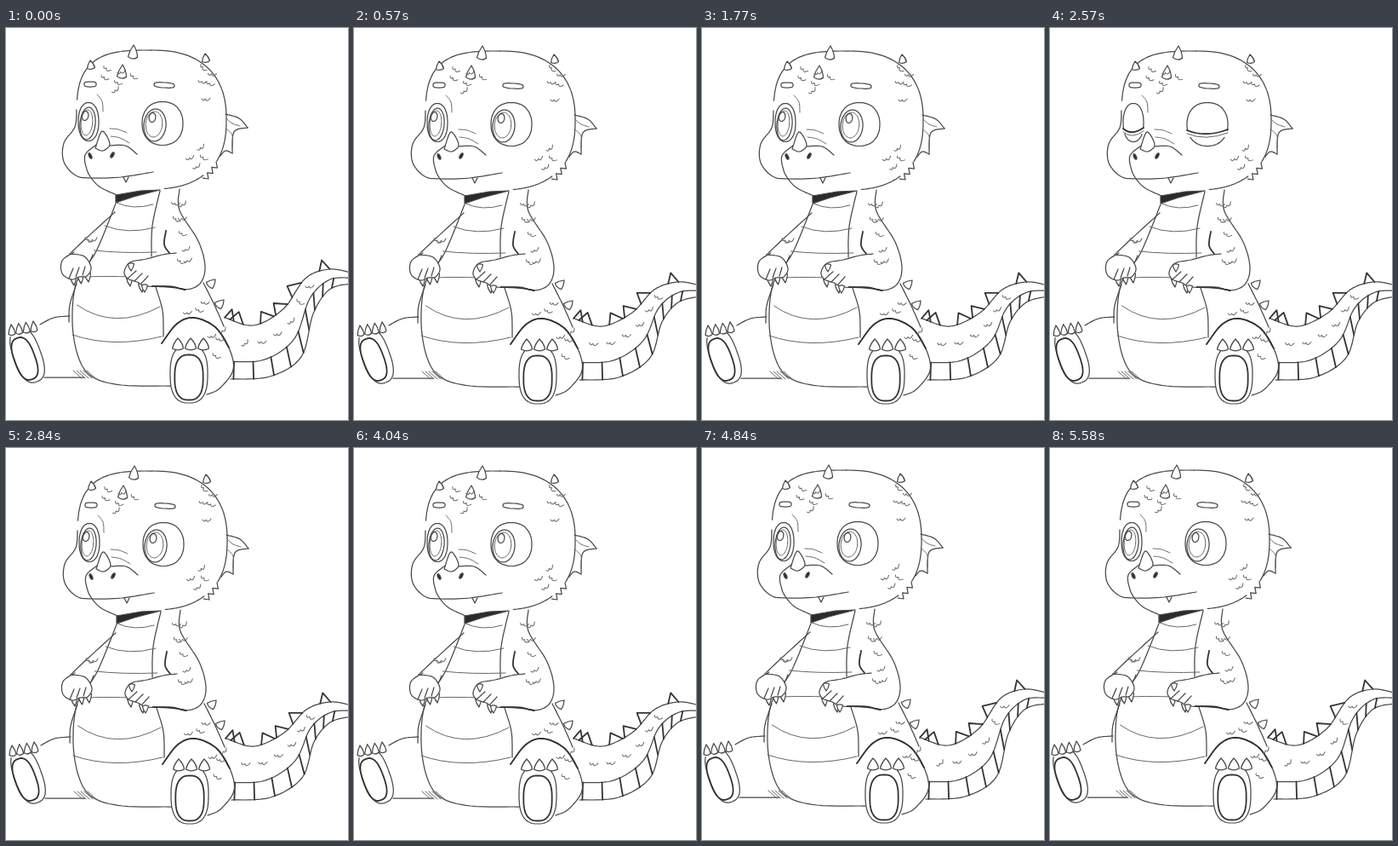
Animation of 402 by 460 pixels, one loop 6070 ms. Source, as an HTML page:

```html
<!DOCTYPE html>
<html lang="en">
<head>
<meta charset="utf-8">
<title>Little dragon</title>
<style>
html, body { margin: 0; width: 100%; height: 100%; overflow: hidden; background: #fff; }
svg { display: block; width: 402px; height: 460px; fill: none; stroke: #484848; stroke-width: 1.25; stroke-linecap: round; stroke-linejoin: round; }
.thin { stroke: #666; stroke-width: 1; }
.bold { stroke: #333; stroke-width: 1.8; }
.white { fill: #fff; }
.ink { fill: #2b2b2b; }
</style>
</head>
<body>
<svg viewBox="0 0 402 460"><g id="dragon"></g></svg>
<script>
const LOOP = 6070;
const dragon = document.getElementById('dragon');

const mix = (a, b, t) => a + (b - a) * t;
const mixPoint = (p, q, t) => p.map((v, i) => mix(v, q[i], t));
const parse = s => s.split(' ').map(p => p.split(',').map(Number));
const range = (n, fn) => Array.from({ length: n }, (_, i) => fn(i));

let seed = 11;
const random = () => (seed = seed * 16807 % 2147483647) / 2147483647;

function group(parent = dragon) {
  const g = document.createElementNS('http://www.w3.org/2000/svg', 'g');
  return parent.appendChild(g);
}
function path(g, d, cls = '') {
  const el = document.createElementNS('http://www.w3.org/2000/svg', 'path');
  el.setAttribute('d', d);
  el.setAttribute('class', cls);
  return g.appendChild(el);
}
const line = (g, pts, cls) => path(g, 'M' + pts.map(p => p.map(v => v.toFixed(1))).join('L'), cls);

// Point at t on a Catmull-Rom curve; whole values of t are the key points
function along(pts, t) {
  const i = Math.max(0, Math.min(pts.length - 2, Math.floor(t))), u = t - i;
  const b = pts[i], c = pts[i + 1], a = pts[i - 1] || b, d = pts[i + 2] || c;
  return b.map((v, k) => v + u / 2 * (c[k] - a[k]
    + u * (2 * a[k] - 5 * v + 4 * c[k] - d[k] + u * (3 * (v - c[k]) + d[k] - a[k]))));
}
const smooth = pts => range((pts.length - 1) * 8 + 1, i => along(pts, i / 8));
const curve = (g, keys, cls) => line(g, smooth(parse(keys)), cls);

// Superellipse arc, angles in degrees clockwise from the right
function arc(g, cx, cy, rx, ry, { n = 2, turn = 0, from = 0, to = 360, cls = '' } = {}) {
  const round = v => Math.sign(v) * Math.abs(v) ** (2 / n);
  const s = Math.sin(turn * Math.PI / 180), c = Math.cos(turn * Math.PI / 180);
  line(g, range(49, i => {
    const a = mix(from, to, i / 48) * Math.PI / 180;
    const x = rx * round(Math.cos(a)), y = ry * round(Math.sin(a));
    return [cx + x * c - y * s, cy + x * s + y * c];
  }), cls);
}

// Row of claws between two points, each pointing along (dx, dy)
function claws(g, n, start, end, width, dx, dy) {
  const len = Math.hypot(dx, dy), wx = -dy / len * width / 2, wy = dx / len * width / 2;
  range(n, i => {
    const [x, y] = mixPoint(start, end, i / (n - 1));
    path(g, `M${x - wx},${y - wy}Q${x - wx * .8 + dx * .5},${y - wy * .8 + dy * .5} ${x + dx},${y + dy}`
      + `Q${x + wx * .9 + dx * .5},${y + wy * .9 + dy * .5} ${x + wx},${y + wy}Q${x - dx * .3},${y - dy * .3} ${x - wx},${y - wy}`, 'white');
  });
}

function scale(g, x, y) {
  const mark = path(g, 'M-5,-1q1,4 4,1q1,5 6,0', 'thin');
  mark.setAttribute('transform', `translate(${x} ${y}) rotate(${random() * 90 - 50})`);
}
function scatter(g, n, cx, cy, rx, ry) {
  range(n, i => {
    const a = i * 2.4 + random(), r = Math.sqrt((i + .5) / n);
    scale(g, cx + rx * r * Math.cos(a), cy + ry * r * Math.sin(a));
  });
}

function drawTail(raised) {
  const g = group();
  const clamp = v => Math.max(0, Math.min(1, v));
  const pose = ([x, y]) => {
    const t = clamp((x - 305) / 60);
    return [x, y - raised * 14 * t * t * (3 - 2 * t) * clamp((375 - y) / 50)];
  };
  const top = parse('258,340 291,349 326,333 352,306 380,297 405,301').map(pose);
  const under = parse('264,412 310,409 347,386 361,344 380,321 405,314').map(pose);
  const seam = t => mixPoint(along(under, t), along(top, t), .28 + .05 * t);

  line(g, smooth(top));
  line(g, smooth(under));
  line(g, range(41, i => seam(i / 8)));
  range(9, i => {
    const t = .2 + i * .5;
    line(g, [seam(t), along(under, t - .08)], 'bold');
  });
  for (const t of [.15, .45, 1.45, 1.95, 2.6, 3.8]) {
    const a = along(top, t - .22), b = along(top, t + .22);
    const k = 12 / Math.hypot(b[0] - a[0], b[1] - a[1]);
    const tip = mixPoint(a, b, .4);
    line(g, [a, [tip[0] + (b[1] - a[1]) * k, tip[1] - (b[0] - a[0]) * k], b], 'bold');
  }
  range(6, i => scale(g, ...mixPoint(seam(.6 + i * .5), along(top, .6 + i * .5), .5)));
  return g;
}

function drawFoot(g, x, y, rx, ry, turn, sole) {
  arc(g, x, y, rx, ry, { n: 2.6, turn, from: -50, to: 230, cls: 'white' });
  arc(g, x - sole, y + 4, rx * .76, ry * .78, { n: 2.6, turn, cls: 'bold' });
}

function drawBody() {
  const g = group();

  // far leg
  curve(g, '75,338 56,340 40,348');
  curve(g, '45,410 92,410');
  drawFoot(g, 25, 384, 16, 33, -20, 3);
  claws(g, 4, [7, 359], [33, 355], 8, -1, -11);

  // belly and its bands
  curve(g, '129,206 106,262 83,298 78,345 85,386 101,409 136,419 196,420');
  curve(g, '83,300 75,325 74,345');
  curve(g, '181,191 172,232 171,268');
  curve(g, '176,304 184,332 185,362');
  [5, 6, 2, -1, 17, 9].forEach((sag, i) => {
    const y = 205 + 26 * i + i * i, left = 78 + 52 * (1 - i / 5) ** 1.4, right = 173 + 2 * i;
    path(g, `M${left},${y}Q${mix(left, right, .45)},${y + sag * 1.8} ${right},${y + 2}`, 'thin');
  });
  line(g, parse('129,196 158,191 181,190 150,198 129,205 129,196'), 'ink');
  range(5, i => line(g, [[79 + i * 4, 402], [89 + i * 4, 411]], 'thin'));

  // far arm
  curve(g, '128,216 95,246 75,265');
  curve(g, '102,266 99,273 92,284');
  claws(g, 3, [79, 292], [96, 288], 7, 1, 10);
  curve(g, '80,263 66,273 66,288 77,295 86,292 95,291 100,281 92,268 75,265', 'white');
  range(3, i => curve(g, `${74 + i * 8},${294 - i * 2} ${79 + i * 7},${282 - i}`));

  // back and near arm
  curve(g, '232,299 245,325 256,350');
  claws(g, 2, [239, 302], [249, 326], 10, 7, -7);
  claws(g, 2, [145, 293], [159, 300], 7, 1, 10);
  curve(g, '204,189 204,214 226,250 234,280 228,300 211,307 194,303 165,303 154,298 143,294 139,286 146,275 165,271 184,266 200,264', 'white');
  curve(g, '188,238 186,254 192,264', 'bold');
  curve(g, '172,303 194,304 211,307', 'bold');
  range(3, i => curve(g, `${143 + i * 8},${294 + i * 3} ${153 + i * 7},${285 + i * 3}`));
  claws(g, 2, [147, 277], [163, 302], 7, 0, 8);

  // near leg
  curve(g, '183,370 201,347 221,340 246,351 262,375 267,401 251,423 236,430', 'white');
  curve(g, '183,370 201,347 221,340 246,351 262,375', 'bold');
  drawFoot(g, 215, 406, 22, 34, 0, 0);
  claws(g, 3, [202, 376], [232, 376], 13, 0, -12);

  scatter(g, 5, 205, 222, 8, 25);
  scatter(g, 3, 211, 270, 8, 12);
  scatter(g, 3, 222, 328, 16, 12);
  scatter(g, 4, 248, 364, 10, 22);
  scatter(g, 2, 101, 245, 5, 7);
}

function drawHead() {
  const g = group();
  arc(g, 171, 108, 88, 82, { n: 3.2, from: 188, to: 270 });
  arc(g, 171, 108, 88, 82, { n: 2.4, from: -90, to: 32 });
  arc(g, 171, 108, 88, 81, { n: 2.4, from: 50, to: 83 });
  line(g, range(7, i => [247 - i * 2.6 + i % 2 * 4, 157 + i * 3.2 + i % 2 * 4]));

  // muzzle
  curve(g, '83,96 81,116 68,135 68,157 82,173 101,176 135,175 173,169');
  curve(g, '106,137 93,149 95,166 101,177 111,187 130,196');
  curve(g, '121,138 140,138 154,148');
  curve(g, '105,141 113,121 122,136 114,144 105,141', 'white');
  line(g, parse('138,175 141,181 144,175'));
  arc(g, 99, 150, 1.5, 3.5, { turn: -25, cls: 'ink' });
  arc(g, 125, 149, 1.5, 3.5, { turn: 30, cls: 'ink' });
  range(2, i => curve(g, `${122 + i},${118 + i * 9} ${132 + i * 2},${119 + i * 10} ${142 + i * 3},${123 + i * 12}`, 'thin'));
  curve(g, '107,78 113,86 114,98', 'thin');

  // brows, horns and ear fin
  arc(g, 99, 66, 7, 3, { n: 3 });
  arc(g, 186, 67, 12, 3, { n: 3, turn: 4 });
  claws(g, 2, [149, 34], [136, 57], 11, 1, -14);
  claws(g, 2, [100, 47], [235, 39], 9, -1, -9);
  curve(g, '258,101 274,106 284,117');
  curve(g, '284,117 268,122 266,147');
  curve(g, '266,147 258,144 252,150');
  range(2, i => curve(g, `259,${106 + i * 12} 266,${112 + i * 14} ${275 - i * 9},${115 + i * 25}`, 'thin'));

  scatter(g, 6, 128, 60, 24, 16);
  scatter(g, 5, 237, 65, 11, 22);
  scatter(g, 4, 227, 150, 18, 13);
}

const eyes = [
  { x: 97, y: 110, rx: 12, ry: 22.5, iris: 9, look: -1 },
  { x: 184, y: 112, rx: 24, ry: 25.5, iris: 13, look: -9 }
];

function drawOpenEyes() {
  const g = group();
  for (const { x, y, rx, ry, iris, look } of eyes) {
    const cx = x + look;
    arc(g, x, y, rx, ry, { n: 2.2 });
    arc(g, cx, y + 2, iris, 19, { turn: 5 });
    arc(g, cx - 1, y + 1, iris * .75, 15, { turn: 5, cls: 'thin' });
    arc(g, cx - 3, y - 7, 3.8, 5.5, { turn: 10 });
  }
  return g;
}

function drawClosedEyes() {
  const g = group();
  for (const { x, y, rx, ry } of eyes) {
    arc(g, x, y, rx, ry, { n: 2.2, from: 165, to: 375 });
    arc(g, x, y, rx, ry, { n: 2.2, from: 35, to: 145 });
    range(2, i => path(g, `M${x - rx},${y + 7 + i * 4}Q${x - 2},${y + 16 + i * 4} ${x + rx},${y + 6 + i * 4}`, i ? 'thin' : 'bold'));
  }
  return g;
}

// Holds each [time, value] until the next one
function hold(el, prop, steps) {
  const frames = steps.map(([t, v]) => ({ offset: t / LOOP, [prop]: v, easing: 'step-end' }));
  frames.push({ offset: 1, [prop]: steps[steps.length - 1][1] });
  el.animate(frames, { duration: LOOP, iterations: Infinity });
}
function swap(first, second, start, end) {
  hold(first, 'visibility', [[0, 'visible'], [start, 'hidden'], [end, 'visible']]);
  hold(second, 'visibility', [[0, 'hidden'], [start, 'visible'], [end, 'hidden']]);
}

const tailUp = drawTail(1), tailDown = drawTail(0);
drawBody();
drawHead();

swap(tailUp, tailDown, 570, 4840);
swap(drawOpenEyes(), drawClosedEyes(), 2570, 2840);
hold(dragon, 'transform', [[0, 'translate(0px,0px)'], [570, 'translate(1px,1px)'], [4840, 'translate(-1px,0px)']]);
</script>
</body>
</html>
```
